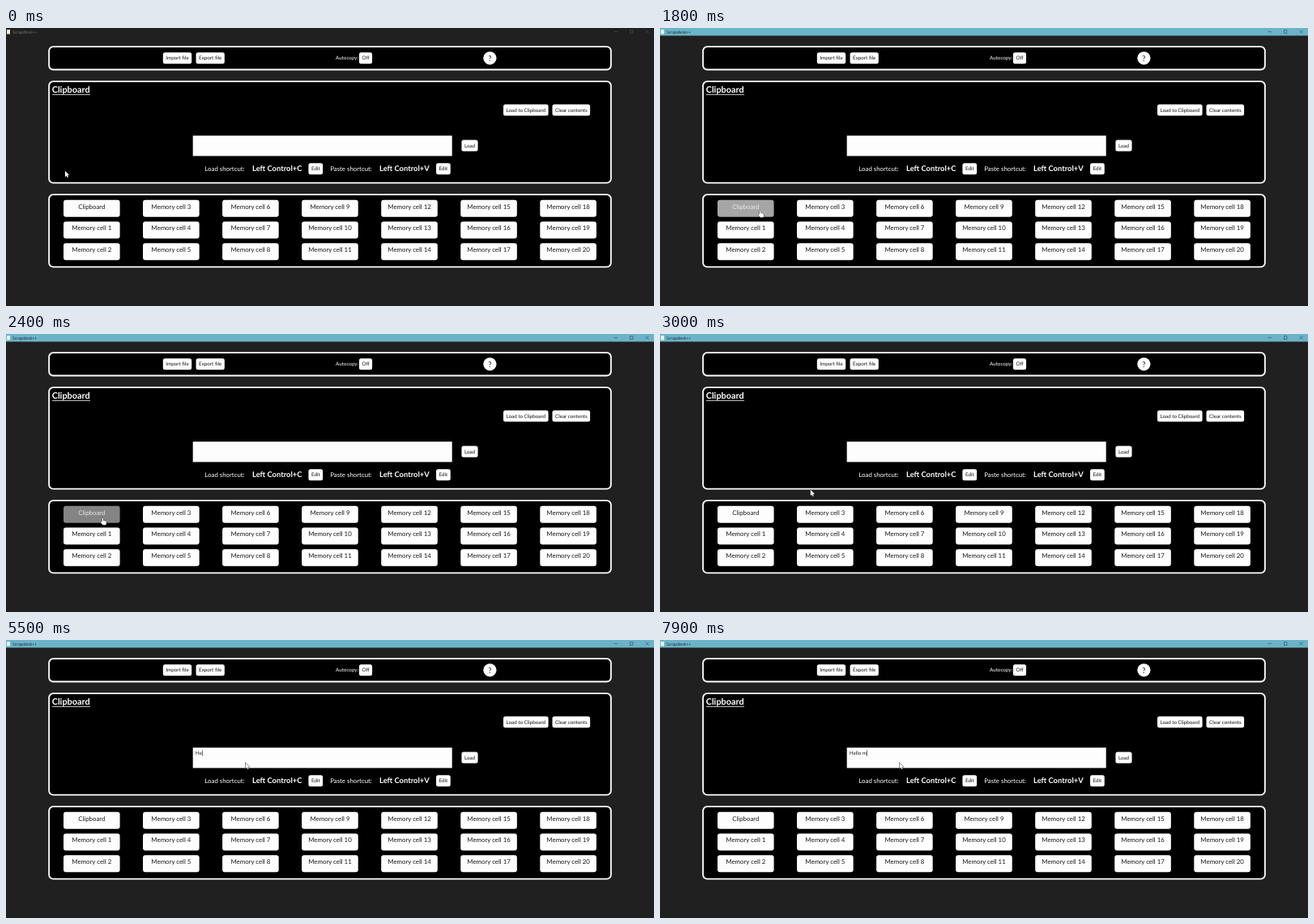
An HTML page with a canvas that plays this animation: 800 px wide and 344 px high, repeating every 8 s.

```html
<!DOCTYPE html>
<html lang="en">
<head>
<meta charset="utf-8">
<title>Clipboard manager</title>
<style>
html, body { margin: 0; width: 100%; height: 100%; overflow: hidden; background: #202020; }
canvas { display: block; width: 800px; height: 344px; }
</style>
</head>
<body>
<canvas id="stage"></canvas>
<script>
const LOOP = 8000, STEP = 100;
const SMALL = 6.25, MEDIUM = 7.85, LARGE = 9.4, HEADING = 10.9;
const canvas = document.getElementById('stage');
const ctx = canvas.getContext('2d');
const dpr = window.devicePixelRatio || 1;
canvas.width = 800 * dpr;
canvas.height = 344 * dpr;

const clamp = (v, min, max) => Math.min(max, Math.max(min, v));
const between = (t, from, to) => t >= from && t < to;

// Progress from 0 to 1 between two times
function ramp(t, from, to) {
  return clamp((t - from) / (to - from), 0, 1);
}

function glide(t, from, to) {
  const k = ramp(t, from, to);
  return k * k * (3 - 2 * k);
}

function typedText(t) {
  const slow = clamp(Math.floor((t - 4900) / 300), 0, 3);
  const fast = clamp(Math.floor((t - 5900) / 100), 0, 4);
  return 'Hello my'.slice(0, slow + fast + between(t, 6600, 7900));
}

function caretOn(t) {
  if (t < 3800) return false;
  return t < 5200 ? (t - 3800) % 700 < 400 : !between(t, 7700, 7900);
}

// Grey of the first cell: hovered, pressed, released, left
function cellGrey(t) {
  const hover = ramp(t, 1300, 1400) - ramp(t, 2700, 2900);
  const press = ramp(t, 2100, 2300) - ramp(t, 2500, 2600);
  return Math.round(255 - 89 * hover - 34 * press);
}

function box(x, y, w, h, r, fill) {
  ctx.beginPath();
  ctx.roundRect(x, y, w, h, r);
  ctx.fillStyle = fill;
  ctx.fill();
}

function panel(y, h) {
  const edge = 1.8;
  box(52.2, y, 695.6, h, 6, '#fff');
  box(52.2 + edge, y + edge, 695.6 - 2 * edge, h - 2 * edge, 4.5, '#000');
}

function text(str, x, y, size, color, align = 'left', weight = 400, family = 'Lato') {
  ctx.font = `${weight} ${size}px ${family}, sans-serif`;
  ctx.textAlign = align;
  ctx.fillStyle = color;
  ctx.fillText(str, x, y);
}

function button(label, cx, cy) {
  ctx.font = `${SMALL}px Lato, sans-serif`;
  const w = ctx.measureText(label).width + 7;
  box(cx - w / 2, cy - 7, w, 14, 2.5, '#fff');
  text(label, cx, cy + 2, SMALL, '#111', 'center');
}

function titleBar(active) {
  if (active) {
    ctx.fillStyle = '#6bb3c8';
    ctx.fillRect(0, 0, 800, 9.5);
  }
  ctx.fillStyle = '#f3efd2';
  ctx.fillRect(1, 2, 4, 5.5);
  text('Scrapdesk++', 8, 6.7, 5.1, active ? '#16272c' : '#777', 'left', 400, '"Open Sans"');
  ctx.strokeStyle = active ? '#2b4a54' : '#555';
  ctx.lineWidth = 0.6;
  ctx.strokeRect(770.3, 2.8, 3.6, 3.6);
  ctx.beginPath();
  ctx.moveTo(750.5, 4.6);
  ctx.lineTo(755, 4.6);
  for (const d of [-2, 2]) {
    ctx.moveTo(791.6 - d, 2.6);
    ctx.lineTo(791.6 + d, 6.6);
  }
  ctx.stroke();
}

function toolbar() {
  panel(22.3, 30.1);
  button('Import file', 211.5, 37.2);
  button('Export file', 252.2, 37.2);
  text('Autocopy:', 407, 39.2, SMALL, '#fff');
  button('Off', 444, 37.2);
  box(589.3, 29.2, 16.2, 16.2, 8.1, '#fff');
  text('?', 597.4, 40.8, LARGE, '#111', 'center');
}

function shortcut(label, keys, x, keysX, editX) {
  text(label, x, 177.1, MEDIUM, '#fff');
  text(keys, keysX, 177.4, LARGE, '#fff', 'left', 700);
  button('Edit', editX, 174.3);
}

function editor(t) {
  panel(65.3, 127.3);
  text('Clipboard', 56.7, 79.7, HEADING, '#fff', 'left', 700);
  ctx.fillStyle = '#bbb';
  ctx.fillRect(57, 82, 47, 1);
  button('Load to Clipboard', 641.8, 101.6);
  button('Clear contents', 697.8, 101.6);
  ctx.fillStyle = '#fdfdfd';
  ctx.fillRect(230.7, 133.2, 320, 25.2);
  button('Load', 572.5, 145.6);
  shortcut('Load shortcut:', 'Left Control+C', 245.3, 304, 382.3);
  shortcut('Paste shortcut:', 'Left Control+V', 400.2, 461, 539.9);

  const str = typedText(t);
  text(str, 233.8, 142.1, SMALL, '#222');
  if (caretOn(t)) {
    ctx.fillStyle = '#333';
    ctx.fillRect(234 + ctx.measureText(str).width, 136.3, 0.7, 7.4);
  }
}

function cells(t) {
  panel(205.3, 91.2);
  const grey = cellGrey(t);
  for (let i = 0; i < 21; i++) {
    const x = 71 + 98.05 * Math.floor(i / 3), y = 212.8 + 26.7 * (i % 3);
    const hot = i === 0 && grey < 255;
    box(x, y, 69.6, 21, 3, hot ? `rgb(${grey},${grey},${grey})` : '#fdfdfd');
    text(i ? 'Memory cell ' + i : 'Clipboard', x + 34.8, y + 10.9, MEDIUM,
      hot ? '#e8e8e8' : '#1a1a1a', 'center');
  }
}

function arrow() {
  const tail = [[0, 0], [0, 7.2], [1.6, 5.7], [2.7, 8.1], [3.8, 7.6], [2.8, 5.3], [5, 5.1]];
  ctx.beginPath();
  for (const [x, y] of tail) ctx.lineTo(x, y);
  ctx.closePath();
  ctx.stroke();
  ctx.fill();
}

// Pointing hand: index finger over a rounded palm with a thumb
function hand() {
  ctx.beginPath();
  ctx.roundRect(1.2, 0, 1.5, 6, 0.7);
  ctx.roundRect(1.2, 3.2, 5, 5, 1.3);
  ctx.roundRect(-0.3, 4.2, 2.2, 2.4, 0.8);
  ctx.stroke();
  ctx.fill();
}

function pointer(t) {
  const out = glide(t, 0, 800), press = glide(t, 1700, 2400);
  const toField = glide(t, 2600, 3500), aside = glide(t, 3900, 4300);
  const x = 73 + 49 * out - 4.5 * press + 164 * toField + 14.2 * aside;
  const y = 177 + 49 * out + 2 * press - 84.3 * toField + 8 * aside;
  ctx.save();
  ctx.translate(x, y);
  ctx.fillStyle = '#fff';
  ctx.strokeStyle = '#333';
  ctx.lineWidth = 1;
  ctx.lineJoin = 'round';
  if (between(t, 1400, 2800)) hand();
  else arrow();
  ctx.restore();
}

function draw(t) {
  ctx.setTransform(dpr, 0, 0, dpr, 0, 0);
  ctx.textRendering = 'geometricPrecision';
  ctx.fillStyle = '#202020';
  ctx.fillRect(0, 0, 800, 344);
  titleBar(t >= 1300);
  toolbar();
  editor(t);
  cells(t);
  pointer(t);
}

const start = performance.now();
function tick() {
  const t = (performance.now() - start) % LOOP;
  draw(Math.floor(t / STEP) * STEP);
  requestAnimationFrame(tick);
}
tick();
</script>
</body>
</html>
```
